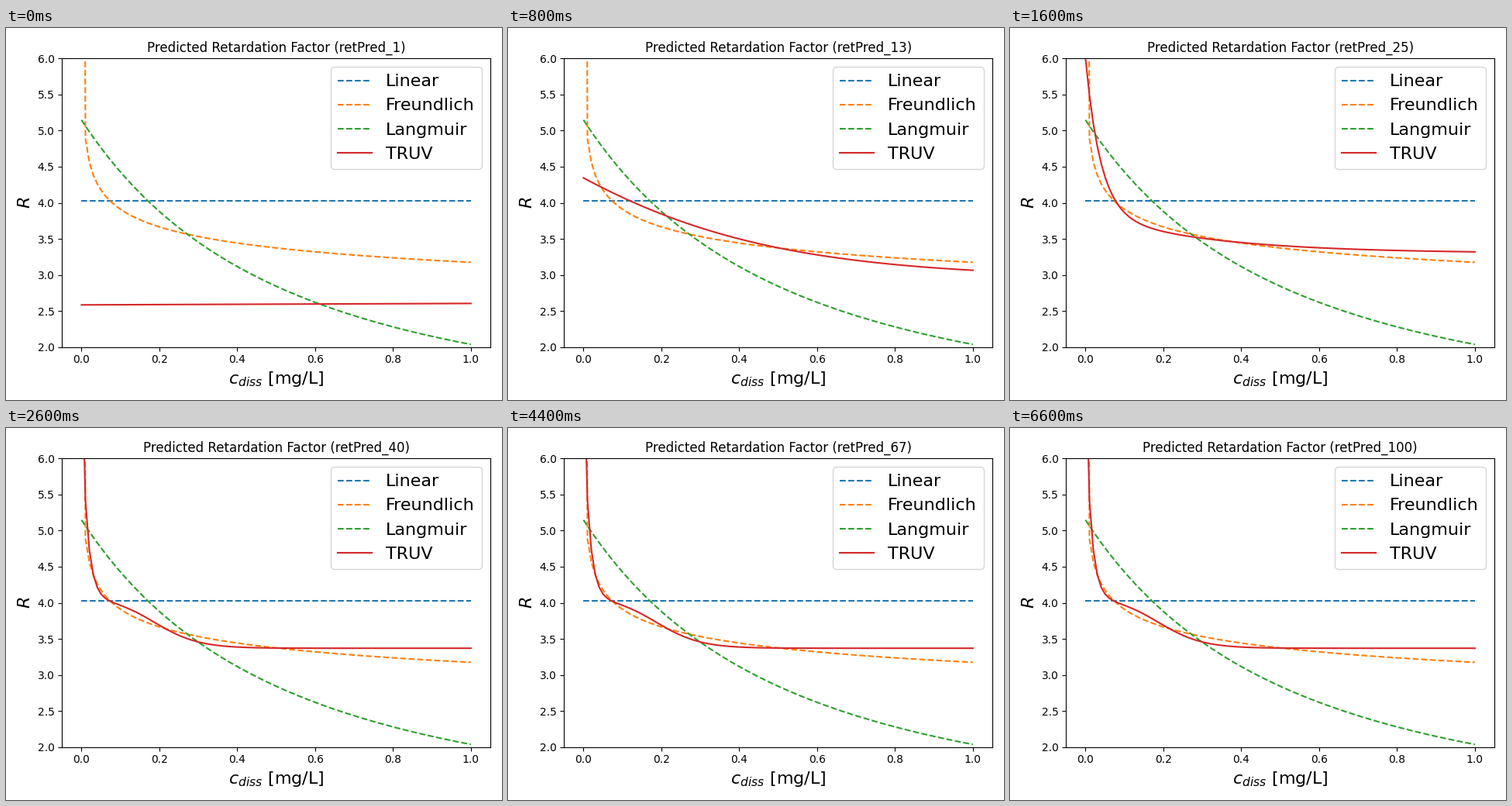
These frames come from a looping animation (640x480 px, 6800 ms). A matplotlib script:

```python
import numpy as np
import matplotlib.pyplot as plt
from matplotlib.animation import FuncAnimation

FRAMES, INTERVAL = 34, 200
EPOCH_STEP = 3
HEIGHT = 480
AXES_TOP = 440.67  # pixels above the lower edge

c = np.linspace(0, 1, 100)

# Sorption isotherms: retardation R = 1 + solid * d(sorbed)/dc
POROSITY, DENSITY = 0.29, 2880
solid = (1 - POROSITY) / POROSITY * DENSITY
linear = np.full_like(c, 1 + solid * 0.429e-3)
freundlich = 1 + 2.175 * np.maximum(c, 1e-8) ** -0.1265
langmuir = 1 + solid / 1700 / (c + 1) ** 2


def decay(amount, scale):
    return amount * np.exp(-c / scale)


def step_down(amount, middle, width):
    return amount / (1 + np.exp((c - middle) / width))


# Learned curve at a few stages of training; stages blend into each other
STAGES = [0, 4, 6, 8, 12]
CURVES = np.array([
    2.585 + 0.02 * c,
    2.958 + step_down(5.157, -0.35, 0.35),
    3.30 + decay(0.62, 0.3) + decay(1.1, 0.07),
    3.30 + decay(0.565, 0.3) + decay(2.14, 0.0385),
    3.37 + step_down(0.72, 0.187, 0.057) + decay(2.6, 0.015) + decay(1.0, 0.003),
])


def learned(i):
    if i < STAGES[1]:
        i = STAGES[1] * (1 - (1 - i / STAGES[1]) ** 1.6)
    weights = [np.interp(i, STAGES, row) for row in np.eye(len(STAGES))]
    return weights @ CURVES


def title_text(i):
    return f"Predicted Retardation Factor (retPred_{1 + EPOCH_STEP * i})"


fig, ax = plt.subplots(figsize=(6.4, HEIGHT / 100), dpi=100)
ax.plot(c, linear, "--", label="Linear")
ax.plot(c, freundlich, "--", label="Freundlich")
ax.plot(c, langmuir, "--", label="Langmuir")
model, = ax.plot(c, learned(0), label="TRUV")

ax.set_xlim(-0.05, 1.05)
ax.set_ylim(2, 6)
ax.set_xlabel("$c_{diss}$ [mg/L]", fontsize=16)
ax.set_ylabel("$R$", fontsize=16)
title = ax.set_title(title_text(0))
ax.legend(loc="upper right", fontsize=16)
fig.tight_layout()
fig.subplots_adjust(top=AXES_TOP / HEIGHT)


def update(i):
    model.set_ydata(learned(i))
    title.set_text(title_text(i))
    return model, title


anim = FuncAnimation(fig, update, frames=FRAMES, interval=INTERVAL,
                     repeat=True, repeat_delay=0, blit=False)
plt.show()
```
